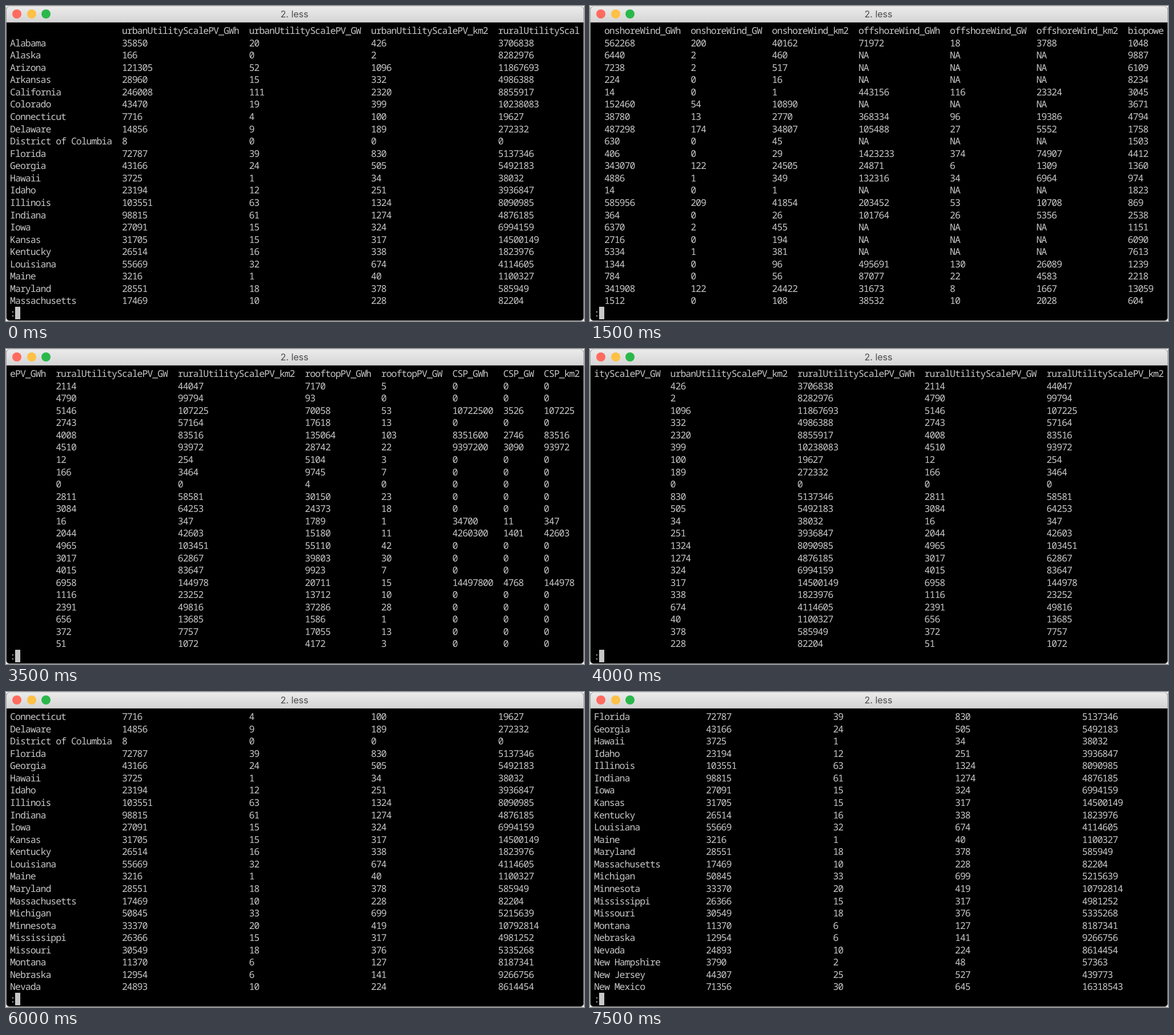
Write an HTML page that moves like this. It is 1012x553 px and loops after 8000 ms.

```html
<!DOCTYPE html>
<html lang="en">
<head>
<meta charset="utf-8">
<title>less</title>
<style>
  html, body { margin: 0; width: 100%; height: 100%; overflow: hidden; background: #fff; }
  .window {
    position: absolute; left: 0; top: 0; width: 1012px; height: 553px;
    box-sizing: border-box; overflow: hidden; background: #000;
    border: 1px solid #a5a5a5; border-top-color: #d2d2d2; border-radius: 6px;
  }
  .bar {
    position: absolute; left: 0; top: 0; width: 100%; height: 28px; box-sizing: border-box;
    background: linear-gradient(#ebebeb, #d5d5d5); border-bottom: 1px solid #b4b4b4;
    font: 16px/27px Inter, sans-serif; color: #4b4b4b; text-align: center;
  }
  .bar span { position: relative; left: -1px; }
  .bar i { position: absolute; top: 5px; width: 16px; height: 16px; border-radius: 50%; }
  pre {
    position: absolute; left: 6.1px; top: 31.1px; margin: 0;
    font: 500 16.5px/21.57px "Noto Sans Mono", monospace; letter-spacing: -1px;
    font-variant-ligatures: none; text-rendering: geometricPrecision; color: #c7c7c7;
  }
  .cursor { position: absolute; left: 15px; top: 527px; width: 9px; height: 22px; background: #c7c7c7; }
</style>
</head>
<body>
<div class="window">
  <div class="bar">
    <i style="left:10px;background:#ff6b5f"></i>
    <i style="left:35.5px;background:#fdc147"></i>
    <i style="left:61px;background:#2bb84b"></i>
    <span>2. less</span>
  </div>
  <pre id="screen"></pre>
  <div class="cursor"></div>
</div>
<script>
const COLS = 112, ROWS = 23, HALF = COLS / 2, STEP = 500;

// State, urban GWh, urban km2, rural GWh; every other column follows by rule
const states = `Alabama,35850,426,3706838
Alaska,166,2,8282976
Arizona,121305,1096,11867693
Arkansas,28960,332,4986388
California,246008,2320,8855917
Colorado,43470,399,10238083
Connecticut,7716,100,19627
Delaware,14856,189,272332
District of Columbia,8,0,0
Florida,72787,830,5137346
Georgia,43166,505,5492183
Hawaii,3725,34,38032
Idaho,23194,251,3936847
Illinois,103551,1324,8090985
Indiana,98815,1274,4876185
Iowa,27091,324,6994159
Kansas,31705,317,14500149
Kentucky,26514,338,1823976
Louisiana,55669,674,4114605
Maine,3216,40,1100327
Maryland,28551,378,585949
Massachusetts,17469,228,82204
Michigan,50845,699,5215639
Minnesota,33370,419,10792814
Mississippi,26366,317,4981252
Missouri,30549,376,5335268
Montana,11370,127,8187341
Nebraska,12954,141,9266756
Nevada,24893,224,8614454
New Hampshire,3790,48,57363
New Jersey,44307,527,439773
New Mexico,71356,645,16318543
New York,52803,688,1492566
North Carolina,68346,822,4232790
North Dakota,4871,59,9734448`.split("\n").map(line => line.split(","));

const noOffshore = /Alaska|Ari|Ark|Colo|Col.mbia|Idaho|Iowa|Kansas|Kentucky/;

const group = (name, ...units) => units.map(unit => `${name}_${unit}`);
const header = ["",
  ...group("urbanUtilityScalePV", "GWh", "GW", "km2"),
  ...group("ruralUtilityScalePV", "GWh", "GW", "km2"),
  ...group("rooftopPV", "GWh", "GW"),
  ...["CSP", "onshoreWind", "offshoreWind"].flatMap(name => group(name, "GWh", "GW", "km2")),
  ...group("biopowerSolid", "GWh", "GW", "BDT"),
  ...group("biopowerGaseous", "GWh")];

let seed = 7;
const random = () => (seed = seed * 16807 % 2147483647) / 2147483647;
const powerOfTen = (low, high) => 10 ** (low + (high - low) * random());

// GWh, GW and km2 of an area with the given yield and capacity per km2
const site = (area, perKm2, density) => {
  const km2 = Math.floor(area);
  return [km2 * perKm2, km2 * density, km2];
};

function stateRow([name, ...figures]) {
  const [urban, urbanArea, rural] = figures.map(Number);
  const perKm2 = urban / (urbanArea || 1);
  const ruralArea = Math.floor(rural / perKm2);
  const rooftop = urban * (0.2 + 0.5 * random());
  const sunny = perKm2 > 91;
  const onshore = site(powerOfTen(0, 5), 14, 0.005);
  const offshore = site(powerOfTen(3, 5), 19, 0.005);
  const biomass = powerOfTen(5.6, 7.4);
  const cells = [
    urban, urbanArea * 0.048, urbanArea,
    rural, ruralArea * 0.048, ruralArea,
    rooftop, rooftop / 1300,
    ...site(sunny ? ruralArea : 0, 100, 0.03289),
    ...onshore,
    ...(noOffshore.test(name) ? ["NA", "NA", "NA"] : offshore),
    biomass * 0.0011, biomass * 0.0011 / 7884, biomass,
    urban * 0.045
  ];
  return [name, ...cells.map(cell => cell === "NA" ? cell : String(Math.floor(cell)))];
}

const table = [header, ...states.map(stateRow)];
const widths = header.map((_, c) => Math.max(...table.map(row => row[c].length)) + 2);
const lines = table.map(row => row.map((cell, c) => cell.padEnd(widths[c])).join(""));

// Pager position at each step: half screens to the right, then lines down
const right = [0, 0, 2, 4, 4, 5, 4, 2, 1, 0];
const down = [1, 4, 7, 10, 13, 10];
const steps = [...right.map(n => [0, n * HALF]), ...down.map(n => [n, 0])];

const screen = document.getElementById("screen");
const start = performance.now();
let shown = -1;

function draw(now) {
  const step = Math.floor(Math.max(0, now - start) / STEP) % steps.length;
  if (step !== shown) {
    const [top, left] = steps[step];
    const view = lines.slice(top, top + ROWS).map(line => line.slice(left, left + COLS));
    screen.textContent = view.join("\n") + "\n:";
    shown = step;
  }
  requestAnimationFrame(draw);
}
draw(start);
</script>
</body>
</html>
```
